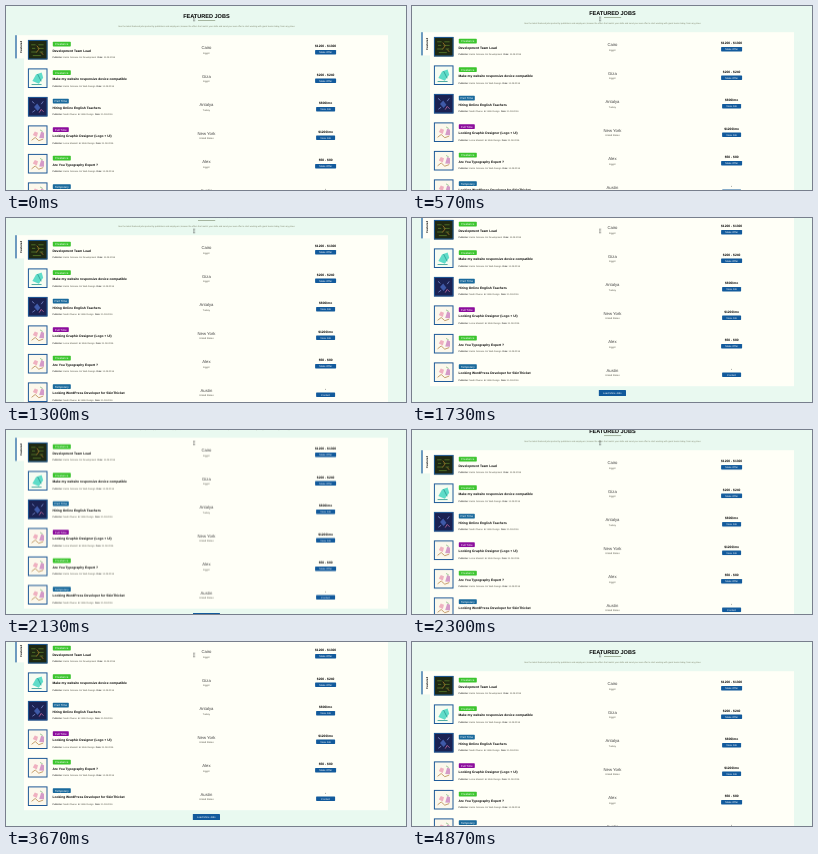
An HTML page that plays this animation: 400 by 184 pixels, repeating every 4900 ms.

```html
<!DOCTYPE html>
<html lang="en">
<head>
<meta charset="utf-8">
<title>Featured jobs</title>
<style>
  html, body { margin: 0; width: 100%; height: 100%; overflow: hidden; background: #e9f9f0; }
  svg { display: block; width: 100vw; height: 100vh; }
  text { font-family: "Liberation Sans", Arial, sans-serif; text-rendering: geometricPrecision; }
  .mid { text-anchor: middle; }
  .bold { font-weight: bold; fill: #000; }
  .city { fill: #444; }
  .soft { fill: #4c4c40; }
  .intro { fill: #7c8268; }
  .white { fill: #fff; }
  #page { animation: scroll 4.9s linear infinite; }
  /* One page unit is a fifth of a stage pixel. */
  @keyframes scroll {
    0%, 7.14% { transform: translateY(0); animation-timing-function: ease-in; }
    11.63% { transform: translateY(-15px); }
    21.84%, 24.49% { transform: translateY(-55px); }
    26.53%, 27.96% { transform: translateY(-60px); animation-timing-function: ease-out; }
    34.69%, 37.76% { transform: translateY(-160px); animation-timing-function: ease-in; }
    46.94% { transform: translateY(-45px); animation-timing-function: ease-out; }
    52.04%, 57.76% { transform: translateY(0); animation-timing-function: ease-in-out; }
    67.96%, 79.59% { transform: translateY(-160px); animation-timing-function: ease-in-out; }
    89.8%, 100% { transform: translateY(0); }
  }
</style>
</head>
<body>
<svg viewBox="0 0 2000 920" preserveAspectRatio="none">
  <g id="page"></g>
  <path d="M936 56h8m-4 0v18m-4 0h8" fill="none" stroke="#333" stroke-width="2.5"/>
</svg>
<script>
const BLUE = '#125a9c', GREEN = '#3cc52e', PURPLE = '#8c0c9c', TEAL = '#1a6a9c', PAPER = '#fffff7';

const rect = (x, y, w, h, fill, more = '') =>
  `<rect x="${x}" y="${y}" width="${w}" height="${h}" fill="${fill}" ${more}/>`;
const text = (x, y, size, cls, str) =>
  `<text x="${x}" y="${y}" font-size="${size}" class="${cls}">${str}</text>`;
const line = (d, color, width = 5) =>
  `<path d="${d}" fill="none" stroke="${color}" stroke-width="${width}"/>`;
const shape = (d, color) => `<path d="${d}" fill="${color}"/>`;
const button = (x, y, w, h, label) =>
  rect(x, y, w, h, BLUE, 'rx="3"') + text(x + w / 2, y + h * .7, 13, 'mid white', label);

// Thumbnail drawings inside a 97 unit square
const art = {
  code: rect(0, 0, 97, 97, '#1f2812') +
    line('M16 24h22m14 0h26M20 42h16m12 0h30M16 60h30m12 0h18M24 78h40', '#4c6a26') +
    line('M44 28l12 16l-14 18M66 62l10 12', '#a8782c', 4),
  device: rect(0, 0, 97, 97, '#f6fcf2') +
    shape('M22 62l18-32l28-10l8 26l-22 30z', '#5fdcc8') +
    line('M18 80h50M48 28l18 36', '#2a9a90', 4),
  night: rect(0, 0, 97, 97, '#1b2252') +
    shape('M30 50l16-18l16 22l-14 16z', '#3f5aa8') +
    line('M20 22l12 10M76 22l-10 14M22 76l14-10', '#7c8cd0', 4) +
    line('M56 78l10-16l12 12', '#c46aa0', 4),
  sketch: rect(0, 0, 97, 97, '#fcf8ec') +
    shape('M24 48l10-18l16 6l-6 22z', '#efb0c0') + shape('M56 62l10-32l14 6v28z', '#d49ac8') +
    line('M18 74l18-14l18 16l22-8', '#b88a50', 4) + line('M60 22l14 8', '#8cc08a', 4)
};

const jobs = [
  ['Freelance', GREEN, 'Development Team Lead', 'Karim Selvane', 'Development', 'Cairo', 'Egypt', '$1200 - $1300', 'Make Offer', 'code'],
  ['Freelance', GREEN, 'Make my website responsive device compatible', 'Karim Selvane', 'Web Design', 'Giza', 'Egypt', '$200 - $240', 'Make Offer', 'device'],
  ['Part Time', TEAL, 'Hiring Online English Teachers', 'Nadir Olvane', 'Web Design', 'Antalya', 'Turkey', '$800/mo', 'View Job', 'night'],
  ['Full Time', PURPLE, 'Looking Graphic Designer (Logo + UI)', 'Lorna Meskell', 'Web Design', 'New York', 'United States', '$1200/mo', 'View Job', 'sketch'],
  ['Freelance', GREEN, 'Are You Typography Expert ?', 'Karim Selvane', 'Web Design', 'Alex', 'Egypt', '$50 - $80', 'Make Offer', 'sketch'],
  ['Temporary', TEAL, 'Looking WordPress Developer for SkinThicket', 'Nadir Olvane', 'Web Design', 'Austin', 'United States', '-', 'Contact', 'sketch']
];

function row([type, color, title, by, field, city, country, pay, action, pic], i) {
  const badgeWidth = type.includes(' ') ? 80 : 90;
  const buttonWidth = action === 'Make Offer' ? 105 : 95;
  const label = name => `<tspan fill="#000">${name}:</tspan>`;
  const meta = `${label('Publisher')} ${by} &#160;${label('In')} ${field} &#160;${label('Date')} 11.08.2016`;
  return `<g transform="translate(0 ${146 + i * 142.5})">
    <g transform="translate(110 24)">${art[pic]}${rect(2, 2, 93, 93, 'none', 'stroke="#1f5a98" stroke-width="5"')}</g>
    ${rect(234, 33, badgeWidth, 23, color, 'rx="3"')}
    ${text(234 + badgeWidth / 2, 49, 14.5, 'mid white', type)}
    ${text(232, 83, 16.4, 'bold', title)}
    ${text(232, 114, 11.5, 'soft', meta)}
    ${text(1002, 69, 21, 'mid city', city)}
    ${text(1002, 93, 12, 'mid soft', country)}
    ${text(1598, 60, 16.4, 'mid bold', pay)}
    ${button(1598 - buttonWidth / 2, 74, buttonWidth, 22, action)}
  </g>`;
}

const intro = 'See the latest featured jobs posted by publishers and employers, browse the offers that match your skills ' +
  'and send your own offer to start working with great teams today, from any place';

document.getElementById('page').innerHTML =
  text(1002, 58, 27.8, 'mid bold', 'FEATURED JOBS') +
  rect(960, 71, 86, 3, '#78886c') +
  text(1002, 103, 10.8, 'mid intro', intro) +
  rect(90, 146, 1820, 855, PAPER) +
  rect(47, 146, 43, 116, PAPER) +
  rect(47, 146, 6, 116, BLUE) +
  `<g transform="translate(78 204) rotate(-90)">${text(0, 0, 14, 'mid bold', 'Featured')}</g>` +
  jobs.map(row).join('') +
  button(933, 1020, 137, 30, 'Load More Jobs');
</script>
</body>
</html>
```
